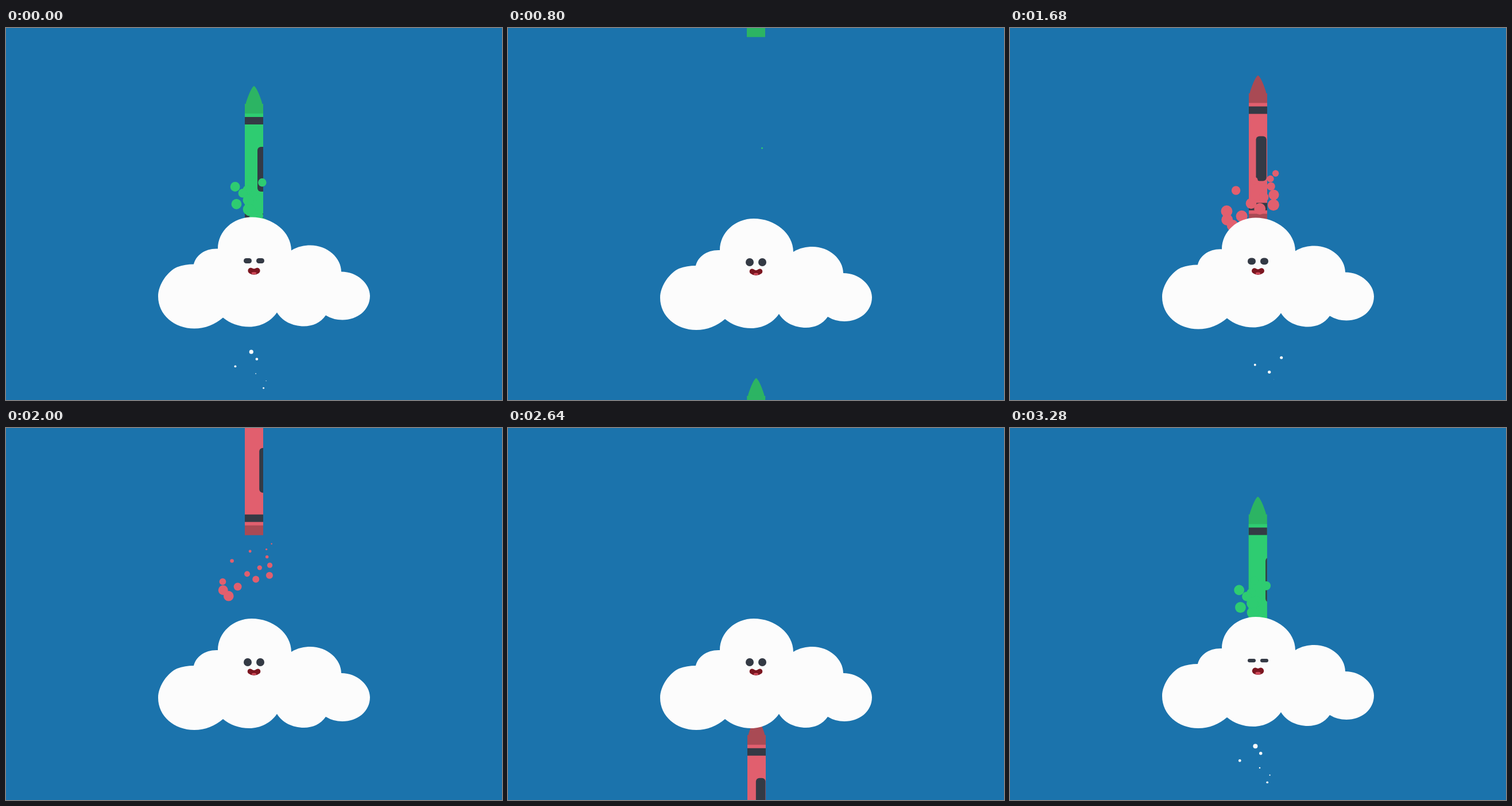
An HTML page with a canvas for the animation above (3.32 s loop, 864 px wide and 648 px high).

```html
<!DOCTYPE html>
<html>
<head>
<meta charset="utf-8">
<title>Cloud and crayons</title>
<style>
html, body { margin: 0; width: 100%; height: 100%; overflow: hidden; background: #1b73ac; }
canvas { display: block; }
</style>
</head>
<body>
<canvas id="stage" width="864" height="648"></canvas>
<script>
const ctx = document.getElementById('stage').getContext('2d');
const LOOP = 3320, HALF = LOOP / 2, STEP = LOOP / 100;
const SPACING = 852, LENGTH = 258, SEAM = 430, TAU = 2 * Math.PI;
const INK = '#343a45', WHITE = '#fcfcfc';
const COLORS = [{ body: '#2ecc71', wax: '#2cb463' }, { body: '#e15f6e', wax: '#a94a54' }];

const CLOUD = new Path2D(`M378 507C364 519 347 526 328 526C293 526 265 502 265 470
  C265 449 282 426 298 419Q312 414 327 414C331 398 347 386 369 387
  C369 356 396 332 428 332C465 332 497 358 497 390C508 383 520 381 530 381
  C560 381 584 403 584 427C612 427 634 448 634 469C634 494 612 511 586 511
  Q570 511 557 503C548 516 534 522 519 522C499 522 481 513 472 498
  C461 514 443 523 424 523C406 523 390 517 378 507Z`);
const TIP = new Path2D('M-14 32V29Q-6 4 0 0Q6 4 14 29V32Z');

let seed = 20240607;
const random = () => (seed = seed * 16807 % 2147483647) / 2147483647;
const spread = size => (random() + random() - 1) * size;
const mod = (a, n) => ((a % n) + n) % n;
const wrap = d => mod(d + HALF, LOOP) - HALF;
const mix = (a, b, u) => a + (b - a) * u;
const smooth = (a, b, t) => {
  const u = Math.min(1, Math.max(0, (t - a) / (b - a)));
  return u * u * (3 - 2 * u);
};

// Coloured blobs rise from the cloud top; the earliest are highest and smallest.
const bursts = COLORS.map(() => Array.from({ length: 14 }, (_, i) => ({
  x: 422 + spread(46),
  y: 262 + 6.5 * i + spread(4),
  r: 6 + 0.55 * i + spread(1.5)
})));

// White drops fall from the cloud base while a crayon is passing through.
const drops = COLORS.map(() => Array.from({ length: 9 }, (_, i) => ({
  birth: 1110 + 42 * i,
  x: 426 + spread(55),
  r: 5.5 + spread(1.5)
})));

// Steady climb with a slow stretch between leaving the top and reaching the cloud.
function tipY(t) {
  const a = TAU * t / HALF;
  return 126.6 - SPACING * t / HALF - 33.8 * Math.cos(a) - 11 * Math.sin(a) + 8.2 * Math.cos(2 * a);
}

function dot(x, y, r, color) {
  if (r <= 0) return;
  ctx.fillStyle = color;
  ctx.beginPath();
  ctx.arc(x, y, r, 0, TAU);
  ctx.fill();
}

function pill(x, y, w, h, r, color) {
  ctx.fillStyle = color;
  ctx.beginPath();
  ctx.roundRect(x, y, w, h, r);
  ctx.fill();
}

function block(y, h, color) {
  ctx.fillStyle = color;
  ctx.fillRect(-16, y, 32, h);
}

// The label is wrapped round the spinning barrel.
function label(age) {
  const angle = mod(202 - 1.045 * age, 360) - 180;
  const edge = deg => Math.abs(deg) < 90 ? 16 * Math.sin(deg * TAU / 360) : 30 * Math.sign(deg);
  const left = edge(angle), right = edge(angle + 80);
  if (angle < 90 && right > -16) pill(left, 106, right - left, 78, 6, INK);
}

function crayonPart(y, age, colors, top, height) {
  const sway = age > -900 && age < 0 ? Math.sin(TAU * age / 900) : 0;
  ctx.save();
  ctx.beginPath();
  ctx.rect(0, top, 864, height);
  ctx.clip();
  ctx.translate(432 + sway, y);
  ctx.fillStyle = colors.wax;
  ctx.fill(TIP);
  block(31, LENGTH - 31, colors.wax);
  block(48, 193, colors.body);
  block(54, 13, INK);
  block(222, 13, INK);
  ctx.beginPath();
  ctx.rect(-16, 0, 32, LENGTH);
  ctx.clip();
  label(age);
  ctx.restore();
}

// Each crayon changes colour inside the cloud.
function crayons(t) {
  for (let k = 0; k < 4; k++) {
    const y = tipY(t) + k * SPACING, age = t - k * HALF;
    if (y > 648 || y < -LENGTH) continue;
    crayonPart(y, age, COLORS[k % 2], 0, SEAM);
    crayonPart(y, age, COLORS[(k + 1) % 2], SEAM, 648 - SEAM);
  }
}

function drawBurst(k, t) {
  const age = wrap(t - k * HALF);
  if (age < -300 || age > 1000) return;
  const grow = smooth(-300, -150, age);
  for (const { x, y, r } of bursts[k])
    dot(x, y - 0.172 * age, Math.min(10, r - 0.0148 * age) * grow, COLORS[k].body);
}

function drawDrops(k, t) {
  for (const { birth, x, r } of drops[k]) {
    const age = wrap(t - birth - k * HALF);
    if (age > 0) dot(x + (x - 432) * 0.001 * age, 500 + 0.3 * age, r - 0.0125 * age, WHITE);
  }
}

function drawCloud(t) {
  const p = mod(t - 200, HALF) + 200;
  const open = 1 - smooth(1140, 1300, p) + smooth(1510, 1760, p);
  ctx.save();
  ctx.translate(0, -3 * (1 - open ** 4));
  ctx.fillStyle = WHITE;
  ctx.fill(CLOUD);
  const eye = Math.max(0.7, 14 * open);
  for (const x of [414, 436]) pill(x, 408 - eye / 2, 14, eye, 7, INK);

  const reach = mix(3, 6.8, open), thick = mix(12.5, 9, open);
  const y = mix(427.6, 424, open), dip = mix(0.5, 5, open);
  ctx.strokeStyle = '#7b1620';
  ctx.lineWidth = thick;
  ctx.lineCap = 'round';
  ctx.beginPath();
  ctx.moveTo(432 - reach, y);
  ctx.quadraticCurveTo(432, y + dip, 432 + reach, y);
  ctx.stroke();
  ctx.fillStyle = '#cf4a5a';
  ctx.beginPath();
  ctx.ellipse(432, y + dip / 2 + thick / 2 - 2.5, mix(5, 4, open), mix(3, 1.8, open), 0, 0, TAU);
  ctx.fill();
  ctx.restore();
}

function draw(now) {
  // The motion advances in 100 even steps per loop
  const t = Math.round(mod(now - start, LOOP) / STEP) * STEP;
  ctx.fillStyle = '#1b73ac';
  ctx.fillRect(0, 0, 864, 648);
  crayons(t);
  for (const k of [0, 1]) {
    drawBurst(k, t);
    drawDrops(k, t);
  }
  drawCloud(t);
  requestAnimationFrame(draw);
}

const start = performance.now();
draw(start);
</script>
</body>
</html>
```
